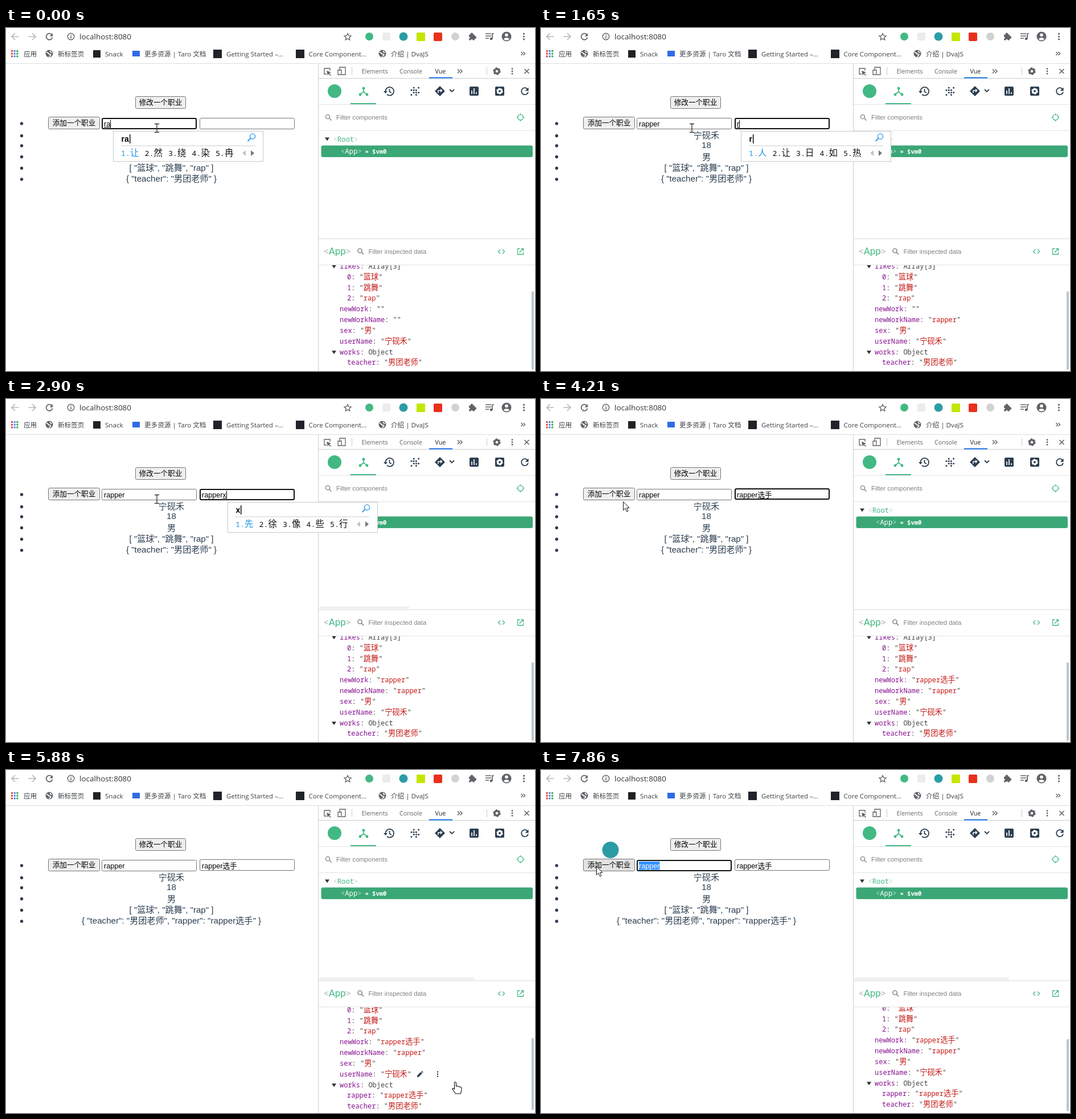
Write an HTML page that moves like this. It is 929 by 603 pixels and loops after 8000 ms.

```html
<!DOCTYPE html>
<html lang="zh-CN">
<head>
<meta charset="utf-8">
<title>Vue devtools demo</title>
<style>
  html, body { margin: 0; width: 100%; height: 100%; overflow: hidden; background: #fff; }
  svg { display: block; }
  text { white-space: pre; }
  .page { font-family: "Liberation Sans", "Noto Sans CJK SC", "Noto Sans CJK", sans-serif; }
  .ui { font-family: "Open Sans", "Noto Sans CJK SC", "Noto Sans CJK", sans-serif; }
  .mono { font-family: "Noto Sans Mono", "Noto Sans CJK SC", "Noto Sans CJK", monospace; }
  .app { font-family: Roboto, sans-serif; }
</style>
</head>
<body>
<svg width="929" height="603" viewBox="0 0 929 603">
  <defs><clipPath id="pane"><rect x="549" y="417" width="380" height="186"/></clipPath></defs>
  <g id="base"></g>
  <g id="live"></g>
</svg>
<script>
const LOOP = 8000;
const INK = '#2c3e50', GREEN = '#42b983', GREY = '#5f6368', KEY = '#881391', RED = '#c41a16';
const $ = id => document.getElementById(id);

// Drawing helpers, all returning SVG markup
const text = (x, y, s, size, cls = 'page', fill = INK, more = '') =>
  `<text x="${x}" y="${y}" font-size="${size}" class="${cls}" fill="${fill}" ${more}>${s}</text>`;
const centred = (y, s) => text(290.5, y, s, 15.12, 'page', INK, 'text-anchor="middle"');
const rect = (x, y, w, h, fill, more = '') =>
  `<rect x="${x}" y="${y}" width="${w}" height="${h}" fill="${fill}" ${more}/>`;
const dot = (x, y, r, fill, more = '') => `<circle cx="${x}" cy="${y}" r="${r}" fill="${fill}" ${more}/>`;
const fill = (x, y, d, color, more = '') =>
  `<path transform="translate(${x} ${y})" d="${d}" fill="${color}" ${more}/>`;
const line = (x, y, d, color, w = 1.5, more = '') =>
  fill(x, y, d, 'none', `stroke="${color}" stroke-width="${w}" ${more}`);
const dots3 = (x, y, color, gap = 4.5, r = 1.5) => [-gap, 0, gap].map(d => dot(x, y + d, r, color)).join('');
const lens = (x, y, color, r = 3.6) =>
  dot(x, y, r, 'none', `stroke="${color}" stroke-width="1.4"`) + line(x + r * .7, y + r * .7, 'M0 0l4 4', color);
const gear = (x, y, r, color) =>
  dot(x, y, r * .62, 'none', `stroke="${color}" stroke-width="${r * .55}"`) +
  dot(x, y, r * .88, 'none', `stroke="${color}" stroke-width="${r * .3}" stroke-dasharray="${r * .46}"`);
const reload = (x, y, r, color, w = 1.8) =>
  line(x, y, `M${r * .75} ${-r * .66}A${r} ${r} 0 1 0 ${r} ${r * .25}`, color, w) +
  fill(x, y, `M${r * 1.1} ${-r * 1.1}v${r}h${-r}z`, color);
const globe = (x, y) => dot(x, y, 6.5, GREY) +
  line(x, y, 'M-5 -2C-1 -3 -3 1 1 1S1 5 -1 5M2 -5C1 -2 3 -2 5 -2', '#fff', 1.7);
const triangle = (x, y) => fill(x, y, 'M-4 -2.5h8l-4 6z', '#333');
const button = (x, y, w, label, hover) =>
  rect(x + .5, y + .5, w - 1, 21, hover ? '#e2e2e2' : '#efefef', 'rx="2" stroke="#767676"') +
  text(x + w / 2, y + 15.3, label, 12.6, 'page', '#000', 'text-anchor="middle"');

const pen = document.createElement('canvas').getContext('2d');
function width(s, size, weight = '') {
  pen.font = `${weight} ${size}px "Liberation Sans", "Noto Sans CJK SC", "Noto Sans CJK", sans-serif`;
  return pen.measureText(s).width;
}

function browserBar() {
  let s = line(16, 15, 'M6.5 0H-6M0 -6L-6 0L0 6', '#b4b6b9', 1.6) +
    line(46, 15, 'M-6.5 0H6M0 -6L6 0L0 6', '#b4b6b9', 1.6) + reload(76, 15, 5.5, GREY) +
    dot(114, 15, 5.8, 'none', `stroke="${GREY}" stroke-width="1.4"`) + rect(113.3, 14, 1.5, 4.5, GREY) +
    rect(113.3, 11.5, 1.5, 1.5, GREY) + text(129, 19.6, 'localhost:8080', 13.5, 'ui', '#333');
  s += line(600, 15.5, 'M0 -6L1.8 -2 6 -1.6 2.8 1.2 3.8 5.4 0 3.2 -3.8 5.4 -2.8 1.2 -6 -1.6 -1.8 -2Z', GREY, 1.3);
  s += dot(638, 15, 7, GREEN) + rect(661, 8, 14, 14, '#ececec', 'rx="2"') + dot(698, 15, 7.5, '#2b9ca5') +
    rect(721, 8, 15, 15, '#c4e600', 'rx="1"') + rect(751, 8, 15, 15, '#e8301c', 'rx="2"') + dot(789, 15, 7, '#d2d2d2');
  s += rect(813, 11.5, 10, 10, GREY, 'rx="1"') + dot(818, 11, 2.5, GREY) + dot(823.5, 16.5, 2.5, GREY) +
    dot(813, 17, 1.8, '#fff') + dot(818, 21.5, 1.8, '#fff');
  s += line(849, 15, 'M-7 -5H3M-7 -1H3M-7 3H-1M5 4V-5H8', GREY, 1.7) + dot(3 + 849, 19, 2.3, GREY);
  s += dot(879, 15, 8.5, GREY) + dot(879, 12.2, 2.8, '#fff') + fill(879, 15, 'M-5 4.5C-4 1 4 1 5 4.5C2 7.5 -2 7.5 -5 4.5', '#fff');
  s += dots3(909.5, 15, GREY, 4.8, 1.6);

  const hues = ['#ea4335', '#4285f4', '#34a853', '#fbbc05'];
  for (let i = 0; i < 9; i++)
    s += rect(9 + i % 3 * 4.7, 39 + (i / 3 | 0) * 4.7, 3, 3, hues[(i + (i / 3 | 0)) % 4]);
  const mark = (x, label) => text(x, 49.8, label, 11.6, 'ui', '#3c4043');
  s += mark(31, '应用') + globe(76, 45) + mark(91, '新标签页') + rect(153, 39, 13, 13, '#222') + mark(174, 'Snack') +
    rect(222, 40, 13, 10, '#2f6be6') + mark(243, '更多资源 | Taro 文档') + rect(364, 38, 15, 15, '#20232a') +
    mark(387, 'Getting Started –...') + rect(509, 38, 15, 15, '#20232a') + mark(531.5, 'Core Component...') +
    globe(661, 45) + mark(676, '介绍 | DvaJS') + line(908, 45, 'M-3.5 -3l3 3-3 3M.5 -3l3 3-3 3', GREY, 1.4);
  return s + rect(0, 62, 929, 1, '#dcdee0');
}

function devtools() {
  const rule = (y, c = '#e4e4e4') => rect(549, y, 380, 1, c);
  let s = rect(548, 63, 1, 540, '#cacdd1') + rule(88, '#cacdd1') + rule(134) + rule(180) + rule(370, '#dcdcdc') + rule(416);
  s += line(564, 76, 'M5 -1V-5H-5V5H-1', GREY, 1.3) + fill(564, 76, 'M-1 -1l8 3-3.4 1.5L7 7 6 8 2.4 4.4 1 8z', GREY) +
    line(590, 76, 'M-4 -2V-7H6V6H0M-7 -2H-1V6H-7Z', GREY, 1.3) + rect(607, 69, 1, 14, '#ccc');
  const tab = (x, label, c = GREY) => text(x, 80, label, 10.7, 'ui', c);
  s += tab(624.5, 'Elements') + tab(691, 'Console') + tab(753.5, 'Vue', '#222') + rect(743, 86.5, 41, 2, '#1a73e8') +
    line(797, 76, 'M-4 -3.5L-.5 0-4 3.5M.5 -3.5L4 0 .5 3.5', GREY, 1.5) + rect(844, 69, 1, 14, '#ccc') +
    gear(862, 76, 6.5, GREY) + dots3(889, 76, GREY, 4.3, 1.4) + line(914.5, 76, 'M-4 -4L4 4M4 -4L-4 4', GREY, 1.7);

  s += dot(577, 111, 12, GREEN) + rect(605, 132, 45, 2, GREEN);
  s += line(628, 111, 'M0 -4V1L-5 5M0 1L5 5', GREEN, 1.7) + dot(628, 106, 2.4, GREEN) + dot(622, 117, 2.4, GREEN) + dot(634, 117, 2.4, GREEN);
  s += line(673, 111, 'M-6.5 1A7.3 7.3 0 1 1 -4 5.8M.5 -4V1L4 3', INK, 1.8) + fill(673, 111, 'M-10 0h7l-3.5 4z', INK);
  for (let y = -1; y < 3; y++) for (let x = -1; x < 3; x++)
    if ((x + y) % 2 || (x > -1 && x < 2 && y > -1 && y < 2)) s += dot(716.2 + x * 4.2, 109.2 + y * 4.2, 1.5, INK);
  s += fill(762, 111, 'M0 -9L9 0 0 9-9 0Z', INK) + line(762, 111, 'M-3 3V-1H3M1 -3.5L3.5 -1 1 1.5', '#fff', 1.5) +
    line(783, 110, 'M-4 -2L0 2L4 -2', INK, 1.8);
  s += rect(814, 103, 16, 16, INK, 'rx="2"') + line(822, 111, 'M-4 5V-1M0 5V-5M4 5V2', '#fff', 1.7) +
    rect(859, 103, 16, 16, INK, 'rx="2"') + gear(867, 111, 5.6, '#fff') + reload(911, 111, 6, INK);

  s += lens(565, 156, '#888') + text(580, 161, 'Filter components', 11.3, 'page', '#808080') +
    dot(903.5, 157, 5, 'none', `stroke="${GREEN}" stroke-width="1.2"`) +
    line(903.5, 157, 'M0 -7V-4M0 4V7M-7 0H-4M4 0H7', GREEN, 1.2);
  s += triangle(564, 195) + text(574.5, 200, `<tspan fill="#ccc">&lt;</tspan>Root<tspan fill="#ccc">&gt;</tspan>`, 12.2, 'mono', GREEN);
  s += rect(553.5, 206.5, 371.5, 20.5, '#3ba776', 'rx="3"') +
    text(588, 221, '<tspan fill="#b5dfca">&lt;</tspan>App<tspan fill="#b5dfca">&gt;</tspan>', 12.2, 'mono', '#fff') +
    text(630.5, 221, '= $vm0', 10.5, 'mono', '#fff', 'font-weight="700"');
  s += text(558, 398, '<tspan fill="#bbb">&lt;</tspan>App<tspan fill="#bbb">&gt;</tspan>', 17, 'app', GREEN) +
    lens(621.5, 391.5, '#777') + text(636.5, 396.7, 'Filter inspected data', 11.3, 'page', '#808080') +
    line(870, 393, 'M-2 -3.5L-5.5 0-2 3.5M2 -3.5L5.5 0 2 3.5', GREEN, 1.3) +
    line(903.5, 393, 'M-1 -5H-5V5H5V1M1 -5H5V-1M5 -5L-2 2', GREEN, 1.3);
  return s;
}

function field(x, s, on, comp, caret, sel = -1) {
  const y = /手/.test(s) ? 157 : 158; // a taller glyph lifts the box
  const tx = x + 4, end = tx + width(s + comp, 12.6);
  let out = on ? rect(x + 1, y + 1, 165, 18, '#fff', 'rx="2" stroke="#101010" stroke-width="2"')
               : rect(x + .5, y + .5, 166, 19, '#fff', 'rx="2" stroke="#767676"');
  if (sel >= 0) {
    const cut = tx + width(s.slice(0, sel), 12.6);
    out += rect(cut, 161, end - cut, 14.5, '#3390ff') +
      text(tx, 172.6, s.slice(0, sel) + `<tspan fill="#fff">${s.slice(sel)}</tspan>`, 12.6, 'page', '#000');
  } else out += text(tx, 172.6, s + comp, 12.6, 'page', '#000');
  if (comp) out += rect(end - width(comp, 12.6), 174, width(comp, 12.6), 1, '#000');
  if (on && caret) out += rect(Math.round(end), 161.5, 1, 14, '#000');
  return out;
}

// Input method window: size follows the candidates
function popup(x, comp, list) {
  let cx = x + 14, items = '';
  list.split(' ').forEach((word, i) => {
    const ascii = /[a-z]/.test(word), c = i ? '#111' : '#1e93e6';
    items += text(cx, 225, `${i + 1}.`, 13.3, 'mono', c) + text(cx + 16, 225, word, ascii ? 13.3 : 15.4, 'mono', c);
    cx += 16 + word.length * (ascii ? 8 : 16) + 9.5;
  });
  const right = cx + 42.5, w = right - x;
  return rect(x + .5, 181.5, w - 1, 53, '#fff', 'stroke="#c8c8c8"') +
    text(x + 14.5, 199.5, comp, 14, 'page', '#000', 'font-weight="700"') +
    rect(Math.round(x + 15.5 + width(comp, 14, 'bold')), 187, 1.4, 16, '#000') +
    rect(x + 14, 206.5, w - 28, 1, '#ccc') + items +
    dot(right - 19, 190.5, 4.6, 'none', 'stroke="#2f9be8" stroke-width="1.4"') +
    line(right - 22.5, 194, 'M0 0L-5 5', '#2f9be8', 1.8) +
    fill(right - 37, 220, 'M0 0l6 -5v10z', '#c4c4c4') + fill(right - 16, 220, 'M0 0l-6 -5v10z', '#777');
}

function inspector({ a, b, added, scroll, tools }) {
  const str = v => ['str', v];
  const rows = [[586, 'likes', 'Array[3]'], [599, '0', str('篮球')], [599, '1', str('跳舞')], [599, '2', str('rap')],
    [586, 'newWork', str(b)], [586, 'newWorkName', str(a)], [586, 'sex', str('男')], [586, 'userName', str('宁砚禾')],
    [586, 'works', 'Object'], ...(added ? [[599, 'rapper', str('rapper选手')]] : []), [599, 'teacher', str('男团老师')]];
  const big = s => s.replace(/[\u4e00-\u9fff]+/g, m => `<tspan font-size="13.2">${m}</tspan>`);
  let s = '';
  rows.forEach(([x, key, val], i) => {
    const y = 419 + i * 18.83 - scroll, leaf = Array.isArray(val);
    if (!leaf) s += triangle(576, y);
    const shown = leaf ? `<tspan>"</tspan><tspan fill="${RED}">${big(val[1])}</tspan><tspan>"</tspan>` : val;
    s += text(x, Math.round(y + 4), `<tspan fill="${KEY}">${key}</tspan>: ${shown}`, 12, 'mono', '#444');
    if (key !== tools) return;
    const px = key === 'teacher' ? 746 : 727;
    s += fill(px, y, 'M-5 5V2.5L1.5 -4 4 -1.5-2.5 5ZM2.3 -4.7L3.5 -5.8 5.8 -3.5 4.7 -2.3Z', INK);
    if (px > 740) s += fill(780, y, 'M-3.7 -2.5H3.7V5.5H-3.7ZM-4.7 -5H-2L-1 -6H1L2 -5H4.7V-3.5H-4.7Z', INK);
    s += dots3(px > 740 ? 810 : 758, y, INK, 4, 1.3);
  });
  const bar = added ? [473 - (19 - scroll) * .7, 127] : [463, 138];
  return `<g clip-path="url(#pane)">${s}${rect(923, bar[0], 4, bar[1], '#b9c5cf', 'rx="2"')}</g>`;
}

const cursors = {
  beam: (x, y) => line(x, y, 'M-4 -7.5H-1L0 -6.5 1 -7.5H4M0 -6.5V6.5M-4 7.5H-1L0 6.5 1 7.5H4', '#333', 1.3),
  arrow: (x, y) => fill(x, y, 'M.5 .5V15.5L4 12.3 6.5 18 9 17 6.5 11.4H11Z', '#fff', 'stroke="#111"'),
  hand: (x, y) => fill(x, y, 'M-1.5 1C-1.5 -1 1.5 -1 1.5 1V7C3 6 4.5 6.5 5 7.5 6.5 7 7.5 7.5 8 8.5 9.5 8 11 9 11 10.5V14L9.5 20H.5L-4.5 13C-6 11 -4 9.5 -1.5 12Z', '#fff', 'stroke="#111" stroke-width="1.1"')
};

// Each step overrides part of the state before it
const steps = [
  [0, { on: 1, a: '', b: '', comp: 'ra', list: '让 然 绕 染 冉', at: 188, cur: ['beam', 265, 176], caret: 1,
        sel: -1, scroll: 0, added: 0, hover: 0, strip: 0, tools: '', ball: 0 }],
  [150, { comp: 'rap', list: 'rap 让 然 绕 染' }],
  [300, { comp: 'rapp', list: 'rapper 让人 然 绕 染' }],
  [450, { comp: 'rappe', list: 'rapper 让人 然 绕 染' }],
  [600, { comp: 'rapper', list: 'rapper 让人 然后 绕 染' }],
  [880, { a: 'rapper', comp: '' }],
  [1130, { on: 2 }],
  [1530, { comp: 'r', list: '人 让 日 如 热', at: 351 }],
  [1770, { comp: 'ra', list: '让 然 绕 染 冉' }],
  [1880, { comp: 'rap', list: 'rap 让 然 绕 染' }],
  [1980, { comp: 'rapp', list: 'rapper 让人 然 绕 染' }],
  [2090, { comp: 'rappe' }],
  [2190, { comp: 'rapper', list: 'rapper 让人 然后 绕 染' }],
  [2470, { b: 'rapper', comp: '' }],
  [2590, { strip: 158 }],
  [2900, { comp: 'x', list: '先 徐 像 些 行', at: 389 }],
  [3020, { comp: 'xu', list: '需 许 徐 续 须' }],
  [3160, { comp: 'xuan', list: '选 宣 旋 玄 悬' }],
  [3290, { comp: "xuan'sh", list: '选手 选上 宣示 玄术 选什么' }],
  [3570, { b: 'rapper选手', comp: '', strip: 0 }],
  [3940, { cur: ['beam', 242, 178], caret: 0 }],
  [4080, { cur: ['beam', 186, 179] }],
  [4210, { cur: ['arrow', 144, 180] }],
  [4350, { cur: ['arrow', 128, 175], hover: 1 }],
  [4480, { cur: ['arrow', 122, 170], caret: 1 }],
  [4910, { on: 0, added: 1, strip: 272 }],
  [5250, { cur: ['arrow', 240, 232], hover: 0 }],
  [5380, { cur: ['arrow', 420, 350] }],
  [5500, { cur: ['arrow', 610, 470] }],
  [5630, { cur: ['hand', 745, 532], tools: 'sex' }],
  [5750, { cur: ['hand', 789, 549], scroll: 8, tools: 'userName' }],
  [5880, { scroll: 16 }],
  [6000, { scroll: 19, tools: 'works' }],
  [6140, { cur: ['hand', 765, 566], tools: '' }],
  [6280, { cur: ['hand', 720, 578], tools: 'teacher' }],
  [6420, { cur: ['hand', 695, 579] }],
  [6570, { cur: ['hand', 688, 560], tools: '' }],
  [6700, { cur: ['arrow', 590, 470] }],
  [6830, { cur: ['arrow', 430, 365] }],
  [6960, { cur: ['arrow', 309, 286] }],
  [7080, { cur: ['arrow', 262, 220] }],
  [7200, { cur: ['beam', 222, 170] }],
  [7330, { on: 1, cur: ['beam', 212, 169] }],
  [7460, { sel: 3, caret: 0, cur: ['beam', 190, 169] }],
  [7590, { sel: 0, cur: ['beam', 150, 170] }],
  [7720, { cur: ['beam', 98, 174] }],
  [7860, { cur: ['arrow', 97, 169], hover: 1, ball: 1 }]
];
let state = {};
const states = steps.map(([, change]) => state = { ...state, ...change });

function draw(s) {
  const [kind, x, y] = s.cur;
  const works = '{ "teacher": "男团老师"' + (s.added ? ', "rapper": "rapper选手"' : '') + ' }';
  $('live').innerHTML =
    button(74, 156, 91, '添加一个职业', s.hover) +
    field(168, s.a, s.on === 1, s.on === 1 ? s.comp : '', s.caret, s.sel) +
    field(340, s.b, s.on === 2, s.on === 2 ? s.comp : '', s.caret) +
    centred(270, works) + inspector(s) +
    (s.strip ? rect(550, 364.5, s.strip, 5, '#f0f0f0') : '') +
    (s.comp ? popup(s.at, s.comp, s.list) : '') +
    (s.ball ? dot(122, 140.5, 14.5, '#2b9ca5') : '') +
    cursors[kind](x, y);
}

$('base').innerHTML = browserBar() + devtools() + button(227, 120, 89, '修改一个职业') +
  [168, 189.5, 207, 226.5, 246.5, 266].map(y => dot(27.5, y, 2.7, INK)).join('') +
  centred(194, '宁砚禾') + centred(211, '18') + centred(231.5, '男') + centred(251, '[ "篮球", "跳舞", "rap" ]');

let shown = -1;
function tick() {
  const t = performance.now() % LOOP;
  const i = steps.findLastIndex(([at]) => at <= t);
  if (i !== shown) draw(states[shown = i]);
  requestAnimationFrame(tick);
}
tick();
</script>
</body>
</html>
```
